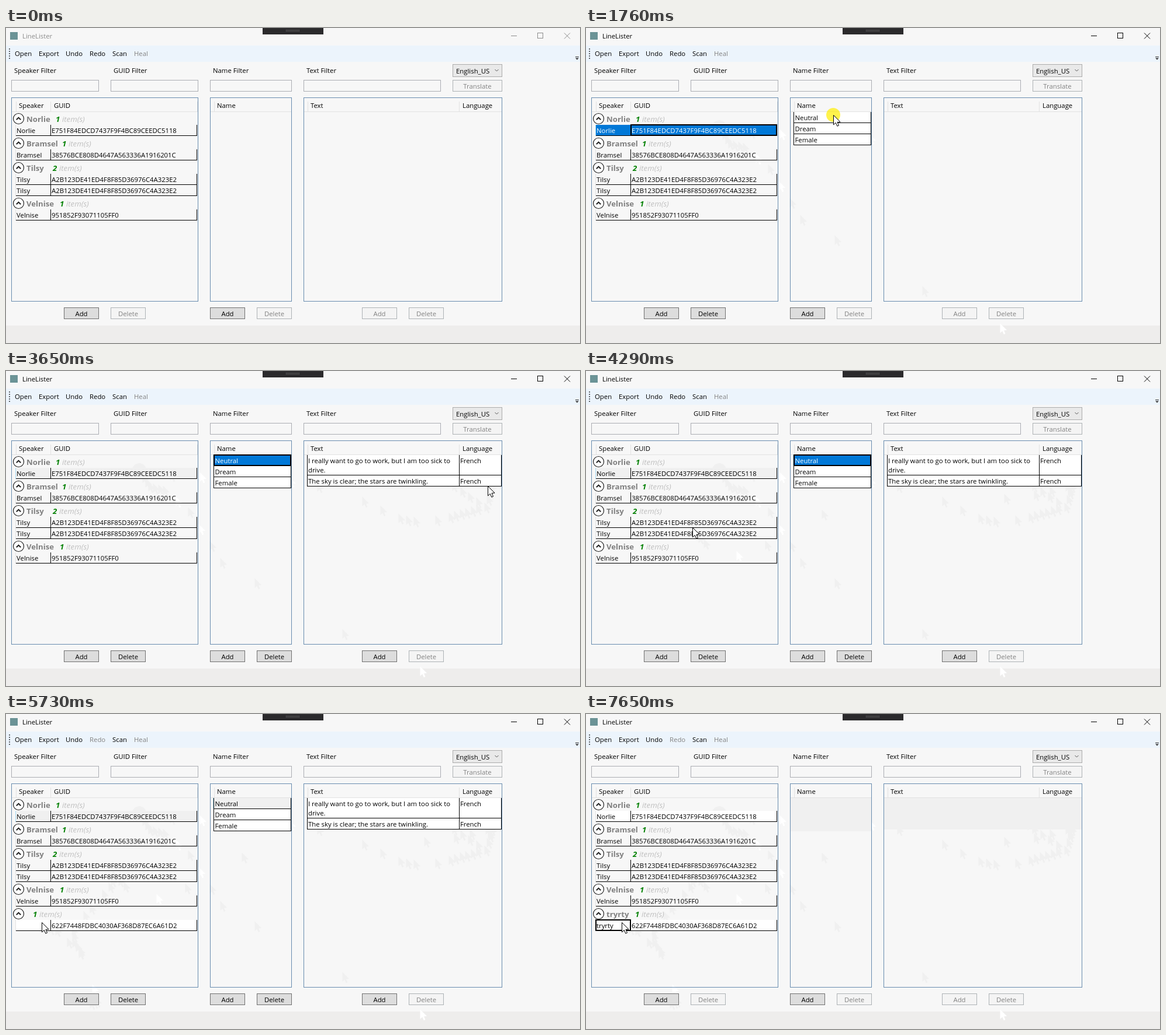
Recreate the animation shown at these times as an HTML page with a canvas. Size 982 px wide and 540 px high, loop 8000 ms.

```html
<!DOCTYPE html>
<html lang="en">
<head>
<meta charset="utf-8">
<title>LineLister</title>
<style>
html, body { margin: 0; width: 100%; height: 100%; overflow: hidden; background: #f7f7f7; }
canvas { display: block; width: 982px; height: 540px; }
</style>
</head>
<body>
<canvas id="stage" width="982" height="540"></canvas>
<script>
const ctx = document.getElementById('stage').getContext('2d');
const LOOP = 8000;
const BG = '#f7f7f7', BLUE = '#0078d7', GHOST = '#f0f0f0', DIM = '#838383', LINE = '#e2e2e2';
const FAMILY = '"Open Sans", "Noto Sans", sans-serif';
const UI = '11.35px ' + FAMILY;
const GUIDS = ['E751F84EDCD7437F9F4BC89CEEDC5118', '38576BCE808D4647A563336A1916201C',
  'A2B123DE41ED4F8F85D36976C4A323E2', '951852F93071105FF0', '622F7448FDBC4030AF368D87EC6A61D2'];

// Times of the events
const T = { focus: 1020, pick: 1120, names: 1175, neutral: 1835, texts: 1890,
  add: 5050, row: 5100, cell: 5900, edit: 5965, type: 6550, commit: 7470, regroup: 7560, done: 7650 };

// Pointer path: each run samples straight legs at a fixed step
const PATH = [];
function run(start, step, x, y) {
  let n = 0;
  PATH.push({ t: start, x, y });
  const leg = {
    to(count, toX, toY) {
      for (let i = 1; i <= count; i++) {
        const k = i / count;
        PATH.push({ t: start + (n + i) * step, x: Math.round(x + (toX - x) * k), y: Math.round(y + (toY - y) * k) });
      }
      n += count;
      x = toX;
      y = toY;
      return leg;
    }
  };
  return leg;
}
run(280, 49.2, 850, 525).to(1, 708, 506).to(1, 575, 442).to(1, 425, 355).to(1, 366, 320)
  .to(3, 311, 233).to(2, 268, 196).to(3, 243, 190).to(3, 228, 168);
run(1175, 55, 228, 168).to(2, 331, 173).to(3, 484, 181).to(4, 423, 149);
run(2120, 60.7, 454, 165).to(2, 609, 215).to(2, 671, 244).to(2, 697, 249)
  .to(1, 734, 247).to(1, 757, 242).to(5, 804, 228);
run(2960, 45.3, 818, 225).to(5, 749, 180).to(4, 796, 159).to(3, 828, 190).to(2, 822, 212).to(3, 829, 166);
run(3780, 45.9, 837, 178).to(2, 820, 190).to(2, 766, 204).to(1, 715, 210).to(1, 403, 237)
  .to(1, 306, 290).to(1, 257, 308).to(1, 201, 287).to(2, 182, 268).to(2, 175, 288).to(4, 132, 337);
run(4610, 49.4, 112, 352).to(3, 113, 384).to(2, 124, 398).to(1, 147, 463).to(1, 152, 484).to(2, 143, 488);
run(5450, 65.5, 124, 402).to(2, 84, 363).to(2, 61, 357);

// Marks the pointer leaves in white instead of grey
const WHITE = [708, 329, 290, 331, 484, 257, 147];
const CLICKS = [[1020, 1175, 228, 168], [1725, 1830, 423, 149], [5000, 5150, 143, 488], [5840, 5950, 61, 357]];

function box(x, y, w, h, fill, stroke) {
  if (fill) { ctx.fillStyle = fill; ctx.fillRect(x, y, w, h); }
  if (stroke) {
    ctx.strokeStyle = stroke;
    ctx.lineWidth = 1;
    ctx.strokeRect(x + 0.5, y + 0.5, w - 1, h - 1);
  }
}

function text(s, x, y, color = '#000', font = UI, align = 'left') {
  ctx.font = font;
  ctx.textAlign = align;
  ctx.fillStyle = color;
  ctx.fillText(s, x, y);
}

function stroke(points, color, width = 1) {
  ctx.beginPath();
  points.forEach(([x, y]) => ctx.lineTo(x, y));
  ctx.strokeStyle = color;
  ctx.lineWidth = width;
  ctx.stroke();
}

function disc(x, y, r, fill) {
  ctx.beginPath();
  ctx.arc(x, y, r, 0, Math.PI * 2);
  ctx.fillStyle = fill;
  ctx.fill();
}

function arrow(x, y, fill, edge) {
  ctx.beginPath();
  [[0, 0], [0, 16.4], [3.8, 12.9], [6.3, 18.8], [9, 17.6], [6.5, 11.9], [11.6, 11.6]]
    .forEach(([a, b]) => ctx.lineTo(x + a + 0.5, y + b + 0.5));
  ctx.closePath();
  ctx.fillStyle = fill;
  ctx.fill();
  if (edge) {
    ctx.strokeStyle = edge;
    ctx.lineWidth = 1;
    ctx.stroke();
  }
}

function button(label, x, y, w, on, hot) {
  box(x, y, w, 20, hot ? '#bee6fd' : on ? '#dddddd' : '#f4f4f4', hot ? '#3c7fb1' : on ? '#707070' : '#adb2b5');
  text(label, x + w / 2, y + 15, on ? '#000' : DIM, UI, 'center');
}

function drawWindow(t) {
  box(0, 0, 982, 540, BG);
  const ink = t >= T.focus ? '#000' : '#8c8c8c';
  box(7, 7, 13, 13, '#6b9396');
  text('LineLister', 28, 18, ink);
  box(864, 13, 10, 1, ink);
  box(909, 8, 10, 10, null, ink);
  stroke([[955, 8.5], [965, 18.5]], ink);
  stroke([[965, 8.5], [955, 18.5]], ink);

  box(439, 0, 104, 11, '#2b2a2c');
  for (let x = 479; x < 503; x += 2) {
    box(x, 3, 1, 1, '#777');
    box(x, 5, 1, 1, '#777');
  }

  box(0, 30, 982, 28, '#ecf4fc');
  for (let y = 35; y < 52; y += 4) box(5, y, 2, 2, '#5f6468');
  [['Open', 15], ['Export', 56], ['Undo', 102], ['Redo', 143], ['Scan', 182], ['Heal', 219]].forEach(([s, x]) => {
    const off = s === 'Heal' || (s === 'Redo' && t >= T.add);
    text(s, x, 48, off ? DIM : '#000');
  });
  box(974, 49, 6, 1, '#333');
  ctx.fillStyle = '#333';
  ctx.beginPath();
  ctx.moveTo(974, 51.5);
  ctx.lineTo(980, 51.5);
  ctx.lineTo(977, 54.5);
  ctx.fill();

  [['Speaker', 9, 150], ['GUID', 179, 150], ['Name', 349, 140], ['Text', 509, 235]].forEach(([s, x, w]) => {
    text(s + ' Filter', x + 5, 77);
    box(x, 89, w, 20, BG, '#abadb3');
  });
  box(764, 62, 85, 22, '#e9e9e9', '#acacac');
  text('English_US', 770, 78);
  stroke([[836.5, 71], [839.5, 74], [842.5, 71]], '#555');
  button('Translate', 764, 89, 85, false);
  box(0, 510, 982, 30, '#eeedec');
}

function drawTrail(t) {
  PATH.forEach((p, i) => {
    const next = PATH[i + 1];
    if (next && t >= next.t && (next.x !== p.x || next.y !== p.y) && p.y < 509)
      arrow(p.x, p.y, WHITE.includes(p.x) ? '#fff' : GHOST);
  });
  if (t >= T.names) disc(228, 170, 12, GHOST);
}

function drawFrames() {
  [[9, 320], [349, 140], [509, 340]].forEach(([x, w]) => {
    box(x, 119, w, 350, null, '#688caf');
    box(x + 1, 143, w - 2, 1, LINE);
  });
  [17, 76, 327, 356, 516, 775].forEach(x => box(x, 126, 1, 17, LINE));
  [['Speaker', 22], ['GUID', 82], ['Name', 361], ['Text', 521], ['Language', 781]]
    .forEach(([s, x]) => text(s, x, 137));
}

function group(name, cy, countX, count, at) {
  const hot = at && at.x < 327 && Math.abs(at.y - cy) < 10;
  ctx.beginPath();
  ctx.arc(21.5, cy, 9, 0, Math.PI * 2);
  ctx.fillStyle = hot ? '#eef5ff' : '#fff';
  ctx.fill();
  ctx.strokeStyle = hot ? '#4a90f0' : '#222';
  ctx.lineWidth = 1.2;
  ctx.stroke();
  stroke([[17.8, cy + 1.8], [21.5, cy - 1.9], [25.2, cy + 1.8]], '#222', 2);
  text(name, 35, cy + 5.5, '#808080', 'bold 13.2px ' + FAMILY);
  text(count, countX, cy + 5.5, '#008000', 'italic bold 13.2px ' + FAMILY);
  text('item(s)', countX + 11, cy + 5.5, '#c0c0c0', 'italic 13.2px ' + FAMILY);
}

function speakerRow(name, guid, y, fill = null) {
  const blue = fill === BLUE;
  box(17, y, 310, 18, fill);
  box(16, y, 1, 19, blue || fill === GHOST ? '#a8dcf4' : LINE);
  box(17, y + 18, 310, 1, '#000');
  box(76, y, 1, 19, '#000');
  box(326, y, 1, 19, '#000');
  text(name, 18, y + 14, blue ? '#fff' : '#000');
  text(guid, 78, y + 14, blue ? '#fff' : '#000');
}

function cellFocus(x, y, w, h) {
  ctx.strokeStyle = '#000';
  ctx.lineWidth = 2;
  ctx.strokeRect(x + 1, y + 1, w - 2, h - 2);
}

function drawSpeakers(t, at) {
  const fill = t < T.pick ? BG : t < T.neutral ? BLUE : t < T.cell ? GHOST : '#fff';
  group('Norlie', 155.5, 85, 1, at);
  speakerRow('Norlie', GUIDS[0], 166, fill);
  if (fill === BLUE) cellFocus(76, 165, 251, 20);
  group('Bramsel', 197.5, 96, 1, at);
  speakerRow('Bramsel', GUIDS[1], 208);
  group('Tilsy', 239.5, 80, 2, at);
  speakerRow('Tilsy', GUIDS[2], 250);
  speakerRow('Tilsy', GUIDS[2], 269);
  group('Velnise', 300.5, 92, 1, at);
  speakerRow('Velnise', GUIDS[3], 311);
  if (t < T.row) return;

  const word = 'tryrty';
  const named = t >= T.regroup;
  group(named ? word : '', 342.5, named ? 84 : 46, 1, at);
  const active = t >= T.cell && !named;
  speakerRow(t >= T.commit ? word : '', GUIDS[4], 353, active ? BLUE : '#fff');
  if (t >= T.edit && t < T.commit) {
    box(17, 353, 59, 18, '#fff');
    const typed = t < T.type ? 0 : Math.min(5, 1 + Math.floor((t - T.type) / 90));
    text(word.slice(0, typed === 5 ? 6 : typed), 20, 367);
  }
  if (named) cellFocus(16, 352, 61, 20);
}

function drawNames(t) {
  if (t < T.names) return;
  if (t >= T.edit) {
    box(350, 144, 138, 57, GHOST);
    return;
  }
  const chosen = t >= T.neutral;
  const blue = chosen && t < T.add;
  ['Neutral', 'Dream', 'Female'].forEach((s, i) => {
    const y = 144 + 19 * i, first = i === 0;
    box(356, y, 131, 18, first && blue ? BLUE : first && chosen ? GHOST : '#fff');
    box(355, y + 18, 133, 1, '#000');
    text(s, 357.5, y + 14, first && blue ? '#fff' : '#000');
  });
  box(355, 144, 1, 57, '#000');
  box(487, 144, 1, 57, '#000');
  if (blue) cellFocus(355, 143, 133, 20);
  if (chosen) box(354, 144, 1, 18, '#a8dcf4');
}

function drawTexts(t) {
  if (t < T.texts) return;
  if (t >= T.edit) {
    box(510, 144, 338, 54, GHOST);
    return;
  }
  box(516, 144, 332, 53, '#fff');
  [515, 775, 847].forEach(x => box(x, 144, 1, 54, '#000'));
  [178, 197].forEach(y => box(515, y, 333, 1, '#000'));
  text('I really want to go to work, but I am too sick to', 517, 158);
  text('drive.', 517, 174);
  text('The sky is clear; the stars are twinkling.', 517, 193);
  text('French', 777, 158);
  text('French', 777, 193);
}

function drawButtons(t, at) {
  const named = t >= T.neutral && t < T.edit;
  const over = at && at.x >= 99 && at.x < 159 && at.y >= 479 && at.y < 499;
  button('Add', 99, 479, 60, true, over);
  button('Delete', 179, 479, 60, t >= T.pick && t < T.regroup);
  button('Add', 349, 479, 60, true);
  button('Delete', 429, 479, 60, named);
  button('Add', 609, 479, 60, named);
  button('Delete', 689, 479, 60, false);
}

function drawPointer(t, at) {
  CLICKS.forEach(([from, to, x, y]) => {
    if (t >= from && t < to) disc(x, y, 12, 'rgba(255, 238, 0, 0.7)');
  });
  if (!at) return;
  if (t < T.edit || t >= T.done) {
    arrow(at.x, at.y, '#fff', '#000');
  } else if (t < T.type) {
    box(64, 350, 1, 15, '#000');
    box(61, 349, 7, 1, '#000');
    box(61, 365, 7, 1, '#000');
  }
}

function draw(t) {
  const at = PATH.filter(p => p.t <= t + 3).pop();
  drawWindow(t);
  drawTrail(t);
  drawFrames();
  drawSpeakers(t, at);
  drawNames(t);
  drawTexts(t);
  drawButtons(t, at);
  drawPointer(t, at);
}

const begin = performance.now();
function tick() {
  draw((performance.now() - begin) % LOOP);
  requestAnimationFrame(tick);
}
tick();
</script>
</body>
</html>
```
